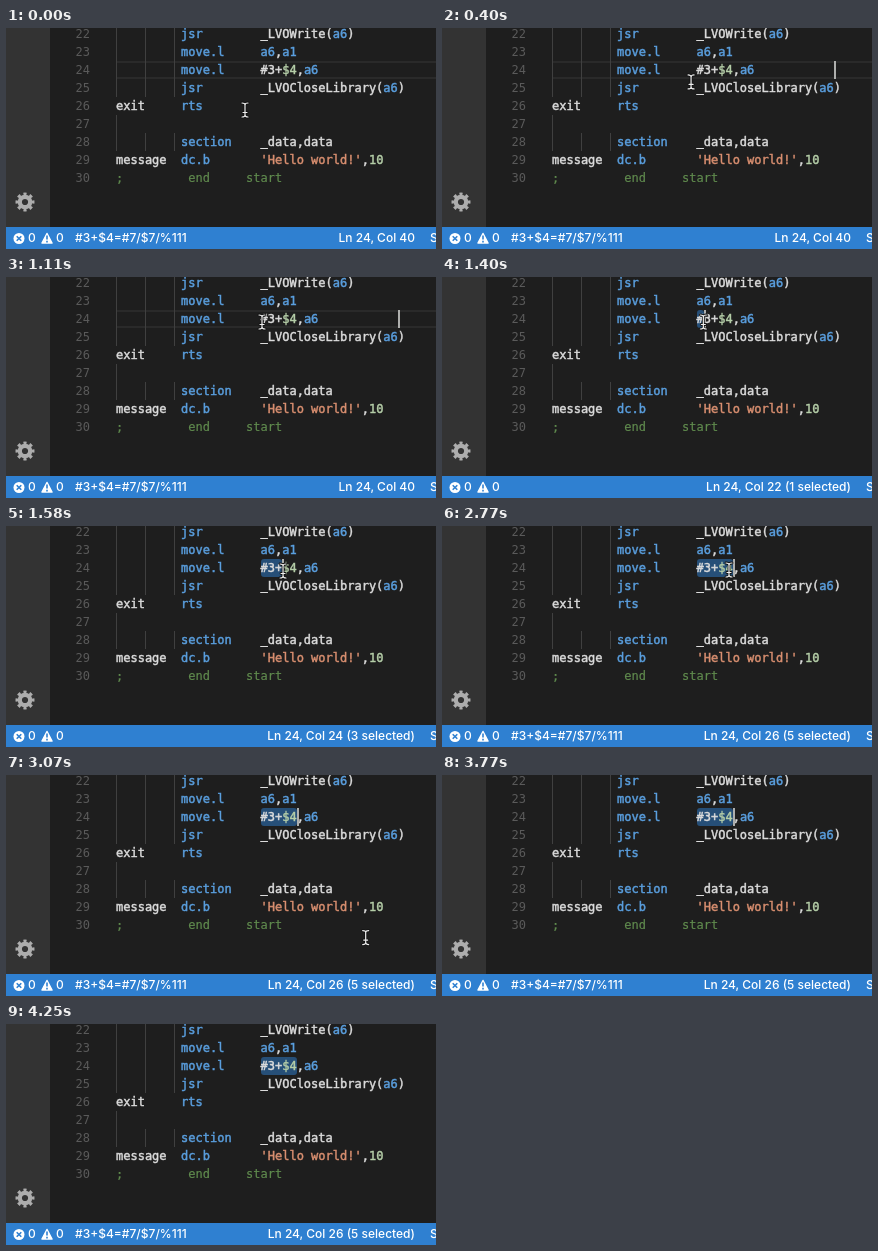
Animation, 430 px wide and 221 px high, one loop 4430 ms. Source, as an HTML page:

```html
<!DOCTYPE html>
<html lang="en">
<meta charset="utf-8">
<title>Evaluating a selection</title>
<style>
  html, body { margin: 0; width: 100%; height: 100%; overflow: hidden; background: #1e1e1e; }
  body { position: relative; }
  body > * { position: absolute; overflow: hidden; }
  #side { left: 0; top: 0; width: 44px; height: 199px; background: #333; }
  #current { left: 110px; right: 0; top: 33px; height: 14px; border: solid #2a2a2a; border-width: 2px 0; }
  #selection { left: 254.5px; top: 33px; height: 18px; border-radius: 3px; background: #264f78; }
  .guide { width: 1px; background: #404040; }
  pre { margin: 0; top: -3px; font: 12px/18px "DejaVu Sans Mono", monospace; }
  #numbers { left: 44px; width: 40px; text-align: right; color: #5a5a5a; }
  #code { left: 110px; color: #dcdcdc; -webkit-text-stroke: .45px; }
  .k { color: #5a9fdf; }
  .s { color: #d98f70; }
  .n { color: #b5cea8; }
  .c { color: #608b4e; -webkit-text-stroke: .2px; }
  #caret { top: 33px; width: 2px; height: 18px; background: #aeafad; }
  #status { left: 0; right: 0; top: 199px; height: 22px; background: #2f80d1; color: #fff;
            font: 500 12px/22px Inter, "Liberation Sans", sans-serif; white-space: nowrap; }
  #status span { position: absolute; top: 0; }
  svg { left: 0; top: 0; display: block; }
</style>
<div id="side"></div>
<div id="current"></div>
<div id="selection"></div>
<pre id="numbers"></pre>
<pre id="code"></pre>
<div id="caret"></div>
<div id="status">
  <span style="left:22px">0</span>
  <span style="left:50px">0</span>
  <span id="result" style="left:69px"></span>
  <span id="position" style="right:21px"></span>
  <span style="left:424px">S</span>
</div>
<svg width="430" height="221" fill="none">
  <defs>
    <path id="beam" d="M-3-7Q0-7 0-5Q0-7 3-7M0-5V5M-3 7Q0 7 0 5Q0 7 3 7M-2 2.5H2"/>
  </defs>
  <g transform="translate(19 174)" stroke="#adadad">
    <circle r="5.2" stroke-width="4.2"/>
    <circle r="8" stroke-width="3" pathLength="16" stroke-dasharray="1" stroke-dashoffset=".5"/>
  </g>
  <circle cx="13" cy="210.5" r="5.5" fill="#fff"/>
  <path d="M10.7 208.2l4.6 4.6m0-4.6l-4.6 4.6" stroke="#2f80d1" stroke-width="1.6"/>
  <path d="M41 205.5l5 9.5h-10z" fill="#fff" stroke="#fff" stroke-width="1.5" stroke-linejoin="round"/>
  <path d="M41 207.5v4m0 1.3v1.6" stroke="#2f80d1" stroke-width="1.6"/>
  <g id="mouse" stroke-linecap="round">
    <use href="#beam" stroke="#111" stroke-width="2.8"/>
    <use href="#beam" stroke="#eee" stroke-width="1.2"/>
  </g>
</svg>
<script>
const $ = id => document.getElementById(id);
const LOOP = 4430, LEFT = 110, CHAR = 7.224;
const columnX = col => LEFT + (col - 1) * CHAR;
const show = (id, on) => $(id).style.display = on ? "" : "none";

// Markup: {k:text} colours a token.
const lines = [
  "         {k:jsr}        _LVOWrite({k:a6})",
  "         {k:move.l}     {k:a6},{k:a1}",
  "         {k:move.l}     #3+{n:$4},{k:a6}",
  "         {k:jsr}        _LVOCloseLibrary({k:a6})",
  "exit     {k:rts}",
  "",
  "         {k:section}    _data,data",
  "message  {k:dc.b}       {s:'Hello world!'},{n:10}",
  "{c:;         end     start}",
];
$("code").innerHTML = lines.join("\n").replace(/\{(\w):([^}]*)\}/g, '<span class="$1">$2</span>');
$("numbers").textContent = lines.map((_, i) => 22 + i).join("\n");

function addGuides(top, height, columns) {
  for (const col of columns) {
    const guide = document.createElement("div");
    guide.className = "guide";
    guide.style.cssText = `left:${Math.round(columnX(col))}px;top:${top}px;height:${height}px`;
    $("code").before(guide);
  }
}
addGuides(0, 69, [1, 5, 9]);
addGuides(87, 18, [1]);
addGuides(105, 18, [1, 5, 9]);

// Pointer path: time, x, y
const path = [
  [0, 239, 82], [60, 239, 82], [400, 249, 54], [520, 257, 47], [640, 257, 47],
  [810, 259, 46], [990, 259, 46], [1110, 256, 45], [1340, 256, 45], [1580, 277, 45],
  [1810, 287, 44], [2900, 287, 44], [3070, 359.5, 162], [3180, 380, 230], [LOOP, 380, 230],
];
function pointerAt(t) {
  const i = path.findIndex(p => p[0] > t);
  const [a, b] = [path[i - 1], path[i]];
  const f = (t - a[0]) / (b[0] - a[0]);
  return [a[1] + (b[1] - a[1]) * f, a[2] + (b[2] - a[2]) * f];
}

const PRESS = 1170, DRAG = 1400, RELEASE = 1810;
const blinks = [120, 640, 1110, 2230, 2770, 3240, 3770, 4250];

function draw(now) {
  const t = now % LOOP;
  const [x, y] = pointerAt(t);
  const selected = t < DRAG ? 0 : t >= RELEASE ? 5
    : Math.min(5, Math.max(0, Math.round((x - columnX(21)) / CHAR)));
  const col = t < PRESS ? 40 : 21 + selected;

  $("mouse").setAttribute("transform", `translate(${x} ${y})`);
  show("mouse", t < 3180);
  show("current", !selected);
  $("selection").style.width = selected * CHAR + "px";
  $("caret").style.left = Math.round(columnX(col)) + "px";
  show("caret", blinks.filter(b => b <= t).length % 2);
  $("position").textContent = `Ln 24, Col ${col}` + (selected ? ` (${selected} selected)` : "");
  $("result").textContent = selected % 5 ? "" : "#3+$4=#7/$7/%111";
}

const start = performance.now();
function tick() {
  draw(performance.now() - start);
  requestAnimationFrame(tick);
}
tick();
</script>
</html>
```
